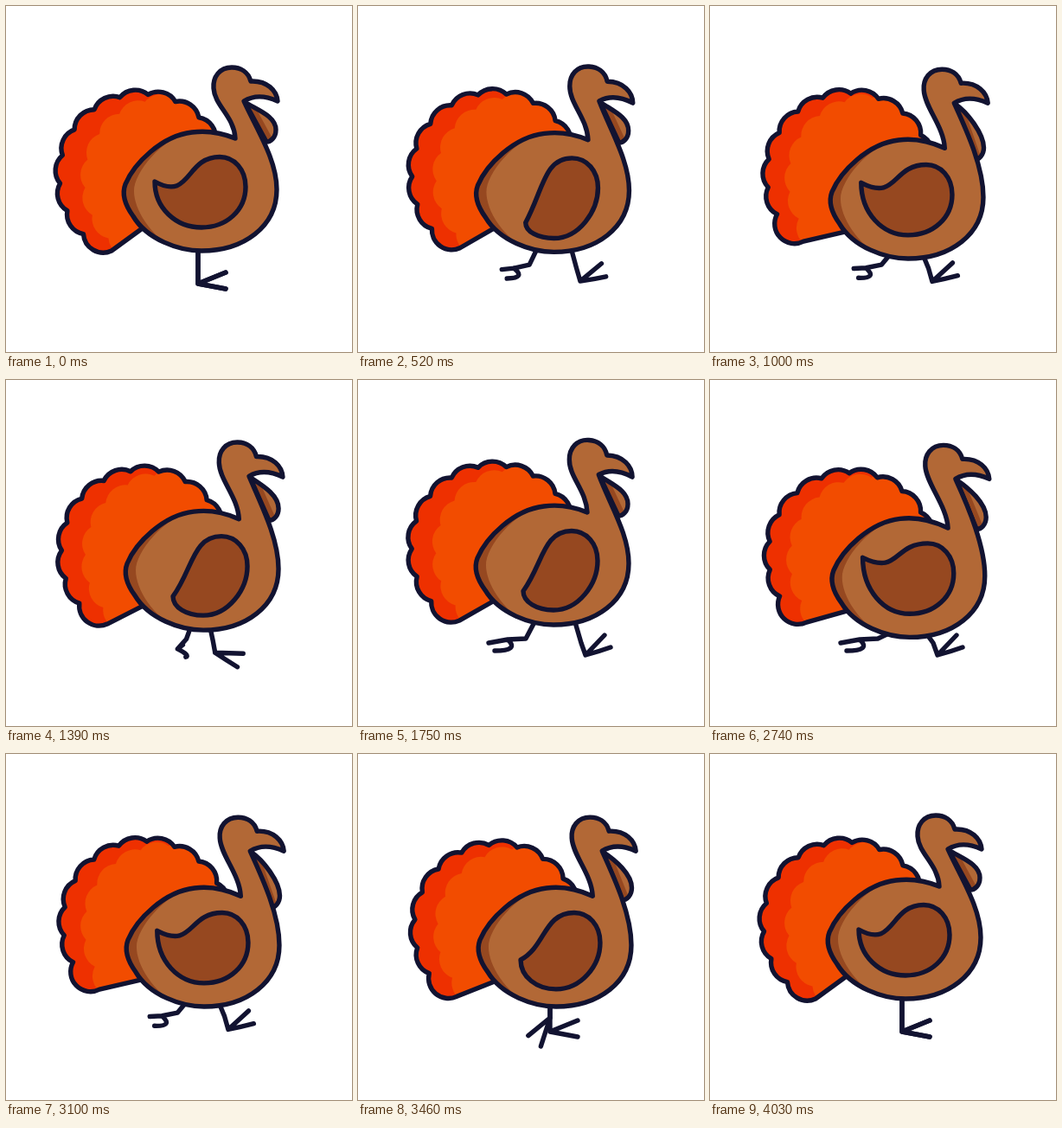
An HTML page with a canvas that plays this animation: 400x400 px, repeating every 4090 ms.

```html
<!DOCTYPE html>
<html>
<head>
<meta charset="utf-8">
<style>
html, body { margin: 0; height: 100%; overflow: hidden; background: #fff; }
canvas { display: block; width: 400px; height: 400px; }
</style>
</head>
<body>
<canvas id="stage" width="400" height="400"></canvas>
<script>
const ctx = document.getElementById('stage').getContext('2d');
const INK = '#121331', BROWN = '#b26836', DARK = '#964820', ORANGE = '#f24c00', RED = '#ee3000';
const LOOP = 4090, STEP = 10, TAU = Math.PI * 2;

// Each leg: hip, knee, ankle, upper toe, bend of lower toe, lower toe
const STAND = [[222, 280], [222, 300], [222, 321], [254, 308], [238, 324], [254, 327]];
const FRONT = [[251, 280], [258, 304], [263, 318], [285, 295], [278, 314], [292, 309]];
const BACK = [[204, 280], [194, 299], [173, 300], [151, 304], [187, 313], [158, 313]];

const mix = (a, b, k) => a + (b - a) * k;
const mod = (a, b) => (a % b + b) % b;
const ease = (v, a, b) => {
  const t = Math.min(1, Math.max(0, (v - a) / (b - a)));
  return t * t * (3 - 2 * t);
};
const shifted = (dx, dy) => (x, y) => ` ${x + dx},${y + dy}`;

function turn(x, y, px, py, degrees) {
  const a = degrees * TAU / 360, c = Math.cos(a), s = Math.sin(a);
  return [px + (x - px) * c - (y - py) * s, py + (x - px) * s + (y - py) * c];
}

function outline(path) {
  ctx.strokeStyle = INK;
  ctx.stroke(path);
}

// Fill a shape, with a second shape painted inside it
function fill(path, base, inner, color, dx = 0, dy = 0) {
  ctx.fillStyle = base;
  ctx.fill(path);
  ctx.save();
  ctx.clip(path);
  ctx.translate(dx, dy);
  ctx.fillStyle = color;
  ctx.fill(inner);
  ctx.restore();
}

// The foot waits in front or behind, then swings past; toes trail on the way forward
function drawLeg(phase, drop, amount) {
  const u = mod(phase, 2), side = u < 1 ? 1 : -1;
  const reach = side * (1 - 2 * ease(u % 1, .4, 1)) * amount;
  const goal = reach > 0 ? FRONT : BACK;
  const points = STAND.map(([x, y], i) =>
    [mix(x, goal[i][0], Math.abs(reach)), mix(y, goal[i][1], Math.abs(reach))]);
  points[0][1] += drop;
  const [hip, knee, ankle, ...toes] = points;
  const trail = side < 0 ? (1 - Math.abs(reach)) ** 2 * amount : 0;
  ankle[1] -= 16 * trail;
  const [upper, bend, lower] = toes.map(([x, y]) => turn(x, y - 16 * trail, ...ankle, 130 * trail));
  outline(new Path2D(`M${hip}L${knee}L${ankle}L${upper}M${ankle}Q${bend} ${lower}`));
}

function drawTail(B, angle) {
  const T = (x, y) => B(...turn(x, y, 203, 197, angle));
  let d = `M${B(170, 248)}L${T(122, 283)}`;
  for (let k = 0; k < 11; k++) {
    const a = (135.4 + 19.85 * k + .3 * angle) * TAU / 360;
    d += `A23 23 0 0 1${T(157 + 94.8 * Math.cos(a), 197 + 94.8 * Math.sin(a))}`;
  }
  const tail = new Path2D(d + 'Z');
  fill(tail, RED, tail, ORANGE, 29 - .3 * angle, 5);
  outline(tail);
}

function drawWattle(H, W) {
  const wattle = new Path2D(`M${H(276, 111)}C${H(290, 120)}${W(312, 127)}${W(312, 143)}
    C${W(312, 152)}${W(306, 157)}${W(301, 157)}Z`);
  fill(wattle, DARK, wattle, BROWN, 8, -2);
  outline(wattle);
}

function drawBody(B, H, N) {
  const body = new Path2D(`M${N(265, 153)}
    C${B(248, 146)}${B(230, 144)}${B(215, 146)}
    C${B(180, 150)}${B(148, 182)}${B(138, 206)}
    C${B(133, 219)}${B(139, 232)}${B(147, 243)}
    C${B(163, 270)}${B(200, 283)}${B(226, 283)}
    C${B(275, 283)}${B(313, 255)}${B(313, 212)}
    C${B(313, 178)}${H(291, 145)}${H(275, 110)}
    C${H(288, 102)}${H(303, 105)}${H(314, 110)}
    C${H(313, 98)}${H(302, 86)}${H(283, 87)}
    C${H(280, 76)}${H(271, 71)}${H(261, 71)}
    C${H(247, 71)}${H(239, 82)}${H(240, 95)}
    C${H(241, 115)}${N(264, 128)}${N(265, 153)}Z`);
  const shade = new Path2D(`M${B(215, 143)}C${B(180, 154)}${B(148, 192)}${B(148, 214)}
    C${B(148, 235)}${B(167, 268)}${B(202, 284)}L${B(130, 284)}L${B(130, 143)}Z`);
  fill(body, BROWN, shade, DARK);
  outline(body);
}

function drawWing(B, lift, drop) {
  const x = mix(191, 172, lift), y = mix(244, 203 - .8 * drop, lift), low = mix(266, 256, lift);
  const wing = new Path2D(`M${B(x, y)}C${B(214, mix(212, 226 - drop, lift))}${B(mix(214, 207, lift), 174.5)}${B(247, 174.5)}
    C${B(264, 174.5)}${B(277, 189)}${B(277, 209)}
    C${B(277, 236)}${B(255, low)}${B(226, low)}
    C${B(mix(x, 226, .45), low)}${B(x, mix(y, low, .58))}${B(x, y)}Z`);
  ctx.fillStyle = DARK;
  ctx.fill(wing);
  outline(wing);
}

function draw(n) {
  const phase = (n - 58) / STEP;
  const start = ease(n, 3, 9);
  const main = start * (1 - ease(n, 119, 129));
  const late = start * (1 - ease(n, 121, 134));
  const wave = lead => .5 - .5 * Math.cos(TAU * (phase + lead));

  const drop = main * (10.7 * wave(.09) + 6.4 * Math.sin(TAU * phase) ** 2 - .85);
  const tilt = Math.max(0, 4 - .45 * drop) * late;
  const headX = .3 * drop + 4.5 * late, headY = .41 * drop - 1.5 * late;

  const B = shifted(.33 * drop, drop);
  const N = shifted(.7 * drop, 1.25 * drop);
  const W = shifted(.5 * drop, 21 * wave(.03) * late);
  const H = (x, y) => shifted(headX, headY)(...turn(x, y, 262, 92, tilt));

  ctx.fillStyle = '#fff';
  ctx.fillRect(0, 0, 400, 400);
  ctx.lineCap = ctx.lineJoin = 'round';
  ctx.lineWidth = 5.4;

  drawTail(B, (3 + 10 * wave(.06)) * late);
  drawLeg(phase, drop, main);
  drawLeg(phase + 1, drop, main);
  drawWattle(H, W);
  drawBody(B, H, N);
  drawWing(B, mix(1, 1.25 * wave(.1) - .12, late), drop);
}

function tick() {
  const t = performance.now() % LOOP;
  draw(Math.min(134, Math.max(3, 4 + Math.floor((t - 124) / 30))));
  requestAnimationFrame(tick);
}
tick();
</script>
</body>
</html>
```
